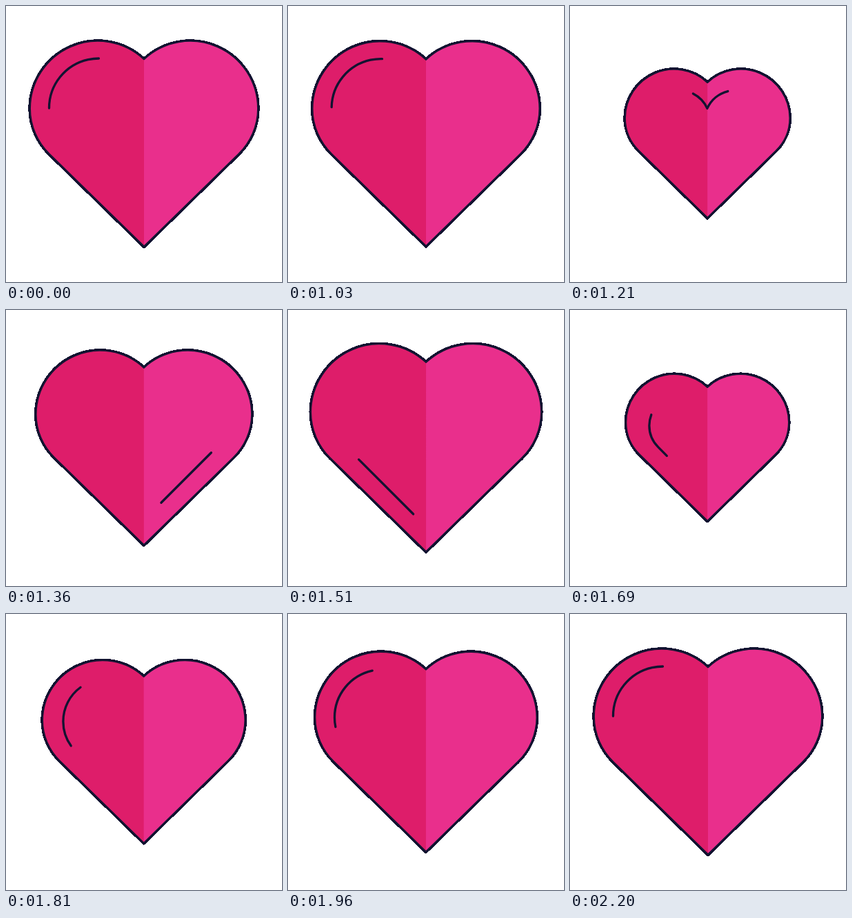
Recreate the animation shown at these times as an HTML page. Size 400 by 400 pixels, loop 2.23 s.

```html
<!DOCTYPE html>
<html lang="en">
<head>
<meta charset="utf-8">
<title>Beating heart</title>
<style>
  html, body { margin: 0; width: 100%; height: 100%; overflow: hidden; background: #fff; }
  svg { display: block; width: 100vw; height: 100vh; }
  .line { fill: none; stroke: #121331; stroke-linecap: round; stroke-linejoin: round; }
  .hard { shape-rendering: crispEdges; }
</style>
</head>
<body>
<svg viewBox="0 0 400 400">
  <defs>
    <path id="body" d="M200 76.5A98.7 98.7 0 0 0 34.3 148.5C34.3 174 45 198 62.5 215L200 349.3L337.5 215C355 198 365.7 174 365.7 148.5A98.7 98.7 0 0 0 200 76.5Z"/>
  </defs>
  <g id="heart">
    <use href="#body" class="line hard" data-weight="4"/>
    <use href="#body" fill="#de1d6a"/>
    <path fill="#e92f8c" d="M200 76.5A98.7 98.7 0 0 1 365.7 148.5C365.7 174 355 198 337.5 215L200 349.3Z"/>
    <use href="#body" class="line" data-weight="3.3"/>
  </g>
  <g id="shine">
    <path class="line" data-weight="3.3" d="M62.5 148A72 72 0 0 1 200 118.1A72 72 0 1 1 316.4 198.9L200 315.3L83.6 198.9A72 72 0 0 1 62.5 148Z"/>
  </g>
</svg>
<script>
const LOOP = 2230, STEP = 30, HOLD = 1030, STEPS = 40;
const PIVOT = [197, 198.4], DASH = 113;

const heart = document.getElementById('heart');
const shine = document.getElementById('shine');
const track = shine.querySelector('path');
const total = track.getTotalLength();

// Cubic easing with handles (a, 0) and (b, 1)
function ease(x, a, b) {
  let lo = 0, hi = 1;
  for (let i = 0; i < 30; i++) {
    const s = (lo + hi) / 2, r = 1 - s;
    if (3 * a * s * r * r + 3 * b * s * s * r + s * s * s < x) lo = s;
    else hi = s;
  }
  return lo * lo * (3 - 2 * lo);
}

// Each beat leg: end step, handles
const legs = [[8.2, 0.67, 0.67], [15, 0.333, 0.667], [21, 0.333, 0.667], [STEPS, 0.333, 0.03]];

function beat(n, low, high) {
  const sizes = [1, low, high, low, 1];
  let start = 0;
  for (let i = 0; i < legs.length; i++) {
    const [end, a, b] = legs[i];
    if (n <= end) {
      const k = ease((n - start) / (end - start), a, b);
      return sizes[i] + (sizes[i + 1] - sizes[i]) * k;
    }
    start = end;
  }
  return 1;
}

// Scales a group but keeps its line weights
function resize(group, size) {
  const [x, y] = PIVOT;
  group.setAttribute('transform', `translate(${x} ${y}) scale(${size}) translate(${-x} ${-y})`);
  for (const line of group.querySelectorAll('.line')) {
    line.setAttribute('stroke-width', line.dataset.weight / size);
  }
}

function draw(ms) {
  const t = ms % LOOP;
  const n = t < HOLD ? 0 : Math.min(STEPS, 1 + Math.floor((t - HOLD) / STEP));
  resize(heart, beat(n, 0.7, 1.12));
  resize(shine, beat(n, 0.59, 1.13));
  const tail = total * ease(n / STEPS, 0.333, 0.08) % total;
  track.setAttribute('stroke-dasharray', `${DASH} ${total - DASH}`);
  track.setAttribute('stroke-dashoffset', -tail);
}

const begin = performance.now();
function tick() {
  draw(performance.now() - begin);
  requestAnimationFrame(tick);
}
tick();
</script>
</body>
</html>
```
